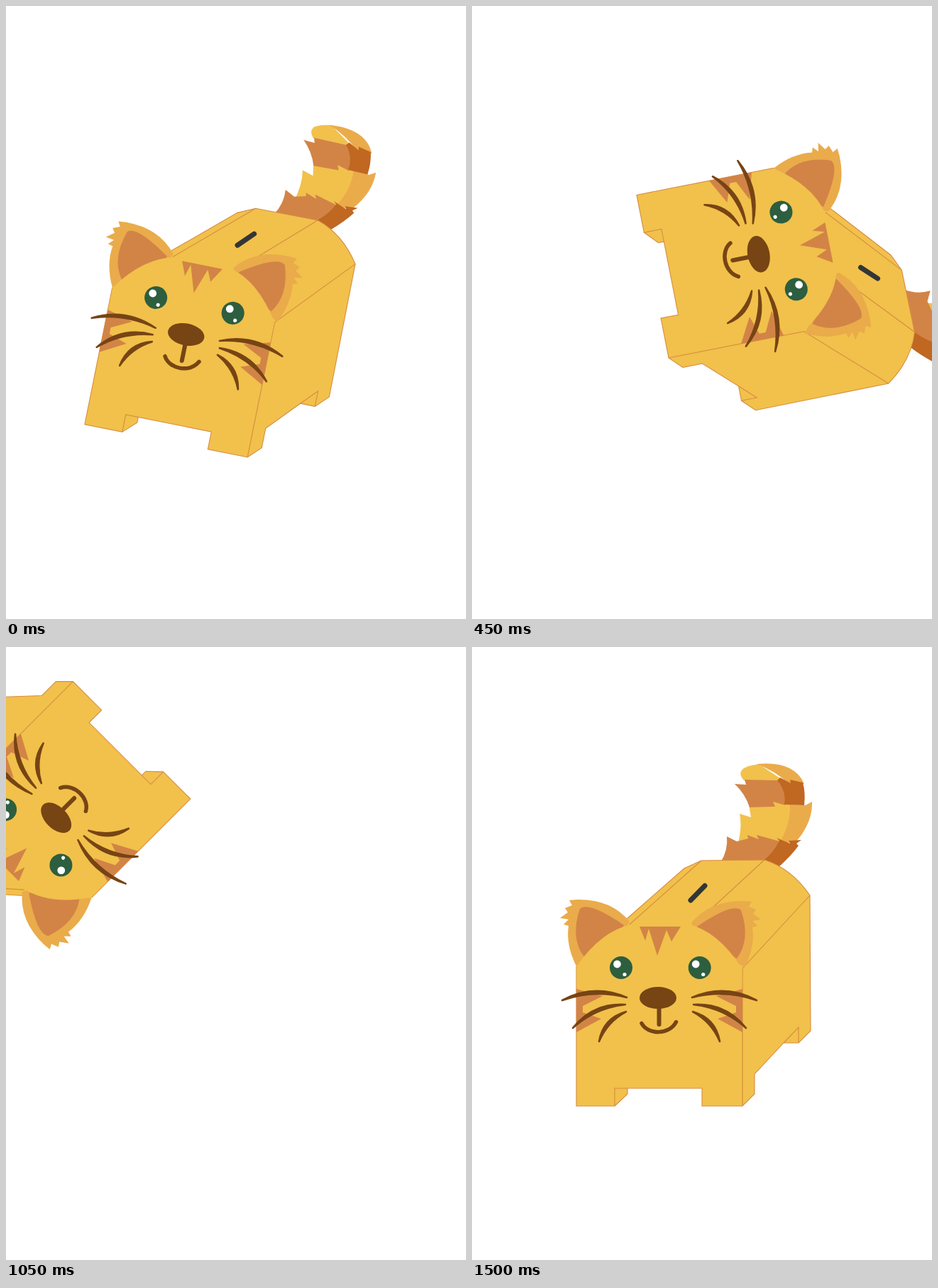
Animation, 648 px wide and 864 px high, one loop 1950 ms. Source, as an HTML page:

```html
<!DOCTYPE html>
<html>
<head>
<meta charset="utf-8">
<style>
html, body { margin: 0; height: 100%; overflow: hidden; background: #fff; }
svg { display: block; width: 100vw; height: 100vh; }
.gold { fill: #f1c14b; }
.light { fill: #eaab4b; }
.tan { fill: #d28447; }
.rust { fill: #c06722; }
.green { fill: #2d5e3f; }
.white { fill: #fff; }
.brown { fill: #774414; }
.fold { fill: none; stroke: #d88b42; stroke-width: 1.1; }
.line { fill: none; stroke: #774414; stroke-linecap: round; }
#whiskers { fill: #774414; stroke: #774414; stroke-width: 2.6; stroke-linejoin: round; }
</style>
</head>
<body>
<svg viewBox="0 0 648 864">
<defs>
  <g id="eye">
    <circle class="green" r="16"/>
    <circle class="white" cx="-5.5" cy="-5" r="5.4"/>
    <circle class="white" cx="5" cy="9.5" r="2.6"/>
  </g>
  <g id="ear">
    <path class="light" d="M147 450Q132 420 136 393L129 391L136 384L124 382L135 374L131 368L141 364L137 357L148 356Q196 355 222 387L214 402Z"/>
    <path class="tan" d="M158 437Q138 410 152 369Q164 358 214 392L205 408Z"/>
  </g>
  <g id="cheek">
    <path class="tan" d="M147 482L184 492L156 506V515L182 524L147 543Z"/>
    <path id="whiskers"/>
  </g>
</defs>
<g id="cat">
  <!-- tail, from tip to root -->
  <path class="gold" d="M377 235L393 240L390 222L424 216H452L446 280H374Q381 254 377 235Z"/>
  <path class="light" d="M448 222L470 223L479 218Q480 247 457 274L432 277Q449 252 448 222Z"/>
  <path class="gold" d="M383 188Q367 170 404 165L446 193Z"/>
  <path class="light" d="M401 165Q454 160 468 193H447Q426 174 401 165Z"/>
  <path class="tan" d="M370 193L386 194L384 187L431 188L442 205L441 223L424 218L427 225L391 226Q385 207 370 193Z"/>
  <path class="rust" d="M434 184L449 192L448 187L466 191Q470 205 468 223L440 222Q443 203 430 188Z"/>
  <path class="tan" d="M359 267L373 274L389 270L388 265L404 271L401 265L434 274L420 304H350Q361 286 359 267Z"/>
  <path class="rust" d="M429 269L448 277L446 273L464 272L457 277L460 280Q449 295 432 310L408 303Q425 290 433 273Z"/>

  <!-- box -->
  <path class="gold" d="M147 647V450L217 384L299 312L323 301L412 300Q450 312 476 350L477 541L460 558H439L398 602V630L381 647H324V622H219V630L201 647Z"/>
  <path class="fold" d="M217 384L299 312L323 301L412 300Q450 312 476 350L477 541L460 558H439L398 602V630L381 647H324V622H201V647H147V450M201 647L219 630V622M381 647V453L476 350M310 394L412 300M222 391L323 301M460 558V536L439 558"/>

  <!-- head -->
  <use href="#ear"/>
  <use href="#ear" transform="translate(531 2) scale(-1 1)"/>
  <path class="gold" d="M147.5 480V450Q182 400 225 391Q264 384 305 391Q346 400 380.5 453V480Z"/>
  <path class="tan" d="M236 394H294L281 415L274 399L261 435L249 397L244 414Z"/>
  <use href="#eye" x="210" y="452"/>
  <use href="#eye" x="320.7" y="452"/>
  <ellipse class="brown" cx="262" cy="494.5" rx="26" ry="15.5"/>
  <path class="line" stroke-width="6" d="M263.5 509V532"/>
  <path class="line" stroke-width="5.5" d="M239 530.5C248 547 278 547 287.500 528.500"/>
  <use href="#cheek"/>
  <use href="#cheek" transform="translate(528 0) scale(-1 1)"/>
  <path fill="none" stroke="#333637" stroke-width="7" stroke-linecap="round" d="M308 357L328 336.500"/>
</g>
</svg>
<script>
const STEP = 150, LOOP = 1950;
// centre x, centre y, turn in degrees; the last pose holds
const poses = [
  [311.4, 384.3, 11.4],
  [340.2, 373.5, 25.5],
  [414.7, 362.3, 43.8],
  [498.5, 373, 78.9],
  [658, 399, 128],
  [805, 422.5, 150.3],
  [1300, 420, 180], // out of view
  [-20.9, 274.2, 225],
  [20, 249, 284],
  [230, 262.2, 343.6],
  [303, 406, 360]
];
const $ = id => document.getElementById(id);

// A tapered hair from tip to root, bowed upwards by bend.
function whisker(x0, y0, x1, y1, bend) {
  const dx = x1 - x0, dy = y1 - y0, len = Math.hypot(dx, dy);
  const control = b => `${(x0 + x1) / 2 + dy / len * b} ${(y0 + y1) / 2 - dx / len * b}`;
  return `M${x0} ${y0}Q${control(bend + 4)} ${x1} ${y1}Q${control(bend - 4)} ${x0} ${y0}Z`;
}

$('whiskers').setAttribute('d',
  whisker(127, 498, 218, 494, 18) +
  whisker(142, 537, 216, 504, 17) +
  whisker(179, 556, 217, 514, 14));

function draw() {
  const i = Math.floor(performance.now() % LOOP / STEP);
  const [x, y, turn] = poses[Math.min(i, poses.length - 1)];
  $('cat').setAttribute('transform', `translate(${x} ${y}) rotate(${turn}) translate(-303 -406)`);
  requestAnimationFrame(draw);
}
draw();
</script>
</body>
</html>
```
